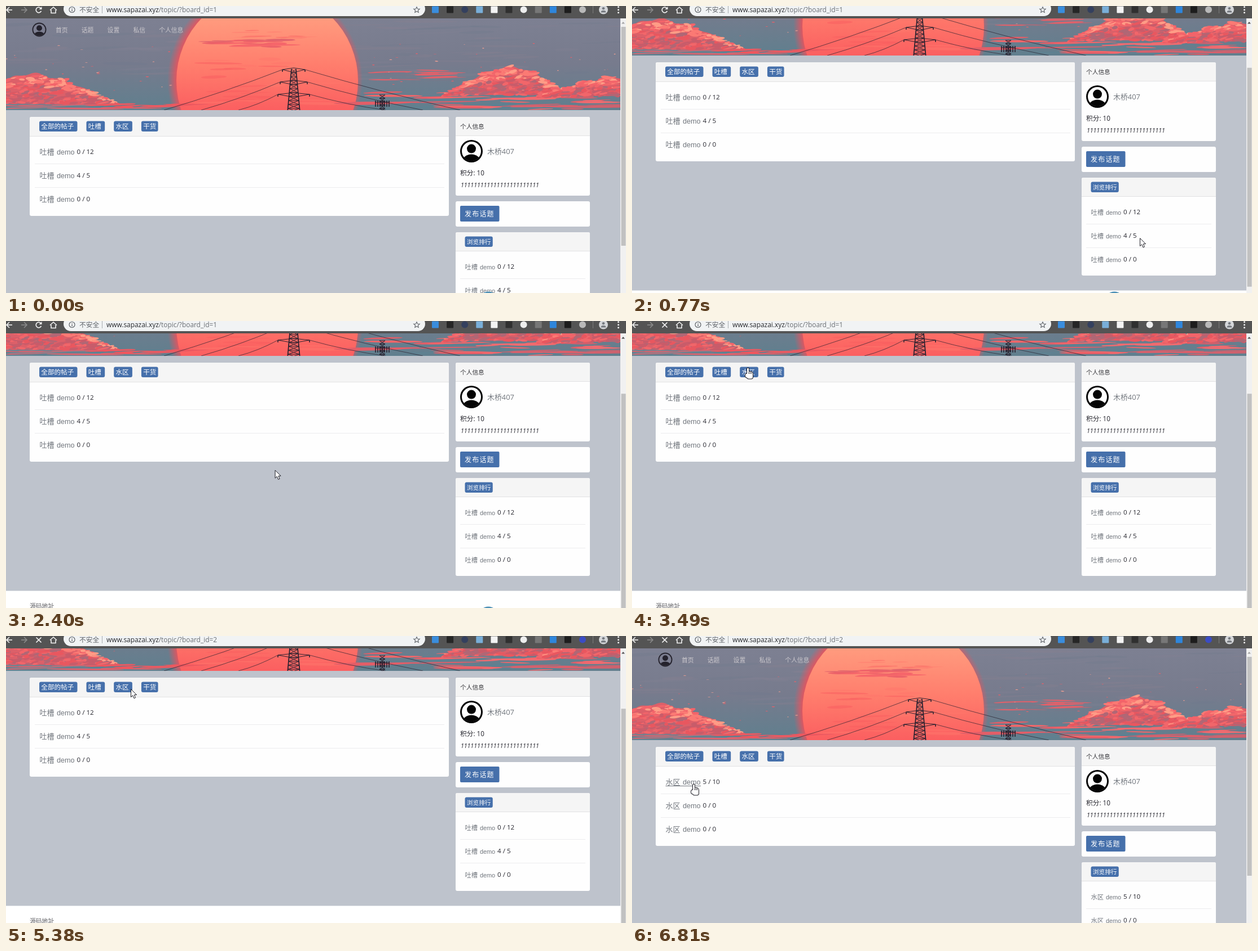
An HTML page with a canvas that plays this animation: 1099 by 510 pixels, repeating every 8000 ms.

```html
<!DOCTYPE html>
<html lang="zh">
<head>
<meta charset="utf-8">
<style>
html, body { margin: 0; width: 100%; height: 100%; overflow: hidden; }
canvas { display: block; }
</style>
</head>
<body>
<canvas id="stage" width="1099" height="510"></canvas>
<script>
const LOOP = 8000, BAR = 22, VIEW = 1089;
const CLICK = 3270, COMMIT = 3900, REPAINT = 5600;
const CJK = '"Noto Sans CJK SC", "Noto Sans CJK JP", "Noto Sans CJK", sans-serif';
const BODY = `"Open Sans", ${CJK}`, LINK = `"Liberation Sans", ${CJK}`;
const BLUE = '#4670ab', GREY = '#71767d', INK = '#25252d', PALE = '#f2f2f2';
const stage = document.getElementById('stage').getContext('2d');
let ctx = stage;

// Drawing helpers
function rect(x, y, w, h, fill, r = 0) {
  ctx.fillStyle = fill;
  ctx.beginPath();
  ctx.roundRect(x, y, w, h, r);
  ctx.fill();
}
function oval(x, y, rx, ry, fill, turn = 0) {
  ctx.fillStyle = fill;
  ctx.beginPath();
  ctx.ellipse(x, y, rx, ry, turn, 0, 7);
  ctx.fill();
}
const disc = (x, y, r, fill) => oval(x, y, r, r, fill);
function trace(points) {
  ctx.beginPath();
  points.forEach(([x, y], i) => i ? ctx.lineTo(x, y) : ctx.moveTo(x, y));
}
function stroke(color, width = 1) {
  ctx.strokeStyle = color;
  ctx.lineWidth = width;
  ctx.stroke();
}
function line(points, color, width) {
  trace(points);
  stroke(color, width);
}
function arc(x, y, r, from, to, color, width) {
  ctx.beginPath();
  ctx.arc(x, y, r, from, to);
  stroke(color, width);
}
// Draws the text and returns its width
function text(str, x, y, size, color, { style = '', family = BODY } = {}) {
  ctx.font = `${style} ${size}px ${family}`;
  ctx.fillStyle = color;
  ctx.fillText(str, x, y);
  return ctx.measureText(str).width;
}
function gradient(top, bottom, colors) {
  const g = ctx.createLinearGradient(0, top, 0, bottom);
  colors.forEach((c, i) => g.addColorStop(i / (colors.length - 1), c));
  return g;
}

// Sunset banner, painted once
function seeded(seed) {
  return () => (seed = (seed * 16807) % 2147483647) / 2147483647;
}
function paintBanner() {
  const canvas = document.createElement('canvas');
  canvas.width = VIEW;
  canvas.height = 185;
  ctx = canvas.getContext('2d');
  const rnd = seeded(4711);
  const between = (a, b) => a + (b - a) * rnd();
  const pick = list => list[Math.floor(rnd() * list.length)];
  const strokes = (n, x0, x1, y0, y1, length, thick, colors) => {
    for (let i = 0; i < n; i++) {
      oval(between(x0, x1), between(y0, y1), length * between(.3, 1),
        thick * between(.3, 1), pick(colors), between(-.05, .03));
    }
  };
  // A cloud is a solid hump with short dabs, lighter towards its crest
  const cloud = (x0, x1, peak, top, base) => {
    const crest = x => {
      const side = x < peak ? (peak - x) / (peak - x0) : (x - peak) / (x1 - peak);
      return base - (base - top) * (1 - side ** 1.6) - 3 * Math.sin(x / 7) * (1 - side);
    };
    ctx.fillStyle = '#dc6069';
    ctx.beginPath();
    for (let x = x0; x <= x1; x += 3) ctx.lineTo(x, crest(x));
    ctx.lineTo(x1, base);
    ctx.lineTo(x0, base);
    ctx.fill();
    for (let i = 0; i < (x1 - x0) * 1.6; i++) {
      const x = between(x0, x1), depth = rnd();
      const tones = depth < .35 ? ['#ff9c86', '#fb7a74', '#f3646a'] : ['#e9575f', '#c85c6a', '#f2666a', '#b06775'];
      oval(x, crest(x) + (base - crest(x)) * depth, between(3, 11), between(1, 3.2), pick(tones), between(-.4, .2));
    }
  };

  rect(0, 0, VIEW, 185, gradient(BAR, 185, ['#7d8092', '#777b8d', '#607f8e']));
  strokes(90, 0, VIEW, 25, 130, 70, 3, ['#84809444', '#6c7a8a44', '#8a7f9044']);

  const glow = ctx.createRadialGradient(459, 132, 158, 459, 132, 173);
  glow.addColorStop(0, '#f0505acc');
  glow.addColorStop(1, '#f0505a00');
  disc(459, 132, 173, glow);
  disc(463, 133, 161, gradient(BAR, 185, ['#ff9b7e', '#ff7e6d', '#fb5f60']));
  strokes(22, 360, 580, 90, 180, 45, 3, ['#fa5f6088', '#ff776c88']);
  strokes(18, 340, 490, 60, 73, 45, 2.5, ['#ec6269', '#f6666a', '#e0636c']);
  strokes(10, 420, 540, 42, 58, 35, 1.5, ['#ff8573', '#fb7269']);

  strokes(30, 620, VIEW, 150, 182, 70, 2.2, ['#e25e68', '#c9626f', '#5e8191', '#f36669']);
  strokes(16, 630, 800, 114, 132, 50, 2, ['#e2616a', '#b96875', '#75798b']);
  cloud(-60, 195, 40, 120, 175);
  cloud(780, 990, 900, 108, 158);
  cloud(950, 1150, 1085, 126, 160);
  strokes(18, 0, 300, 175, 184, 80, 1.8, ['#567f90', '#668897', '#d9646f']);
  strokes(18, 180, 320, 174, 182, 45, 1.6, ['#f4545b', '#e65b63']);
  strokes(20, 780, VIEW, 164, 184, 60, 2, ['#5d8192', '#d8606c', '#ef6b70']);
  strokes(26, 0, 300, 70, 150, 3, .8, ['#f1a092', '#e8616a']);
  strokes(30, 640, VIEW, 60, 150, 3, .8, ['#f1a092', '#e8616a']);

  const dark = '#2a2230';
  for (let y = 112; y < 185; y += 7) {
    const w = 4 + (y - 112) / 11;
    line([[510 - w, y], [510 + w, y + 7], [510 - w, y + 7], [510 + w, y]], dark);
    line([[510 - w, y], [510 - w - .6, y + 7]], dark, 1.8);
    line([[510 + w, y], [510 + w + .6, y + 7]], dark, 1.8);
  }
  for (let arm = 0; arm < 3; arm++) {
    const y = 113 + arm * 22, w = 20 + arm * 4;
    line([[510 - w, y], [510, y - 3], [510 + w, y], [510, y + 5], [510 - w, y]], dark);
    for (const side of [-1, 1]) {
      const x = 510 + side * w, run = (side < 0 ? 210 : 275) - arm * 70;
      line([[x, y], [x, y + 4]], dark, 1.6);
      ctx.beginPath();
      ctx.moveTo(x, y);
      ctx.quadraticCurveTo(x + side * run / 2, (y + 185) / 2 + 5, x + side * run, 185);
      stroke(dark, .7);
    }
  }
  for (let y = 158; y < 185; y += 6) line([[662, y], [672, y + 6], [662, y + 6], [672, y], [662, y]], dark);
  for (let x = 655; x < 681; x += 4) line([[x, 168], [x, 179]], dark, 1.6);
  line([[654, 171], [680, 171]], dark);
  ctx = stage;
  return canvas;
}
const banner = paintBanner();

// Pointer way points: time, x, y
const route = [
  [450, 912, 512], [680, 901, 415], [1230, 895, 398], [1700, 850, 338], [2120, 880, 389],
  [2400, 477, 265], [3050, 205, 83], [3600, 205, 83], [4060, 312, 190], [4810, 290, 188],
  [5380, 221, 94], [5750, 221, 94], [6810, 109, 263]];

function cursorAt(t) {
  if (t < route[0][0]) return null;
  const next = route.findIndex(k => k[0] > t);
  if (next < 0) return route.at(-1).slice(1);
  const [t0, x0, y0] = route[next - 1], [t1, x1, y1] = route[next];
  const p = (t - t0) / (t1 - t0);
  return [x0 + (x1 - x0) * p, y0 + (y1 - y0) * p];
}
function scrollAt(t) {
  if (t >= REPAINT) return 0;
  const tick = 680 + 85 * Math.floor((t - 680) / 85);
  const p = Math.min(1, Math.max(0, (tick - 560) / 290));
  return Math.round(123 * p * p * (3 - 2 * p));
}

// Page parts; links note whether the pointer is over them
let pointer = null, hand = false;
function hover(x, y, w, h) {
  const over = pointer && pointer[0] >= x && pointer[0] <= x + w && pointer[1] >= y && pointer[1] <= y + h;
  hand = hand || over;
  return over;
}
function card(x, y, w, h, head) {
  rect(x, y, w, h, '#fefefe', 3);
  if (!head) return;
  rect(x, y, w, head, '#f5f5f5', [3, 3, 0, 0]);
  rect(x, y + head, w, 1, '#e2e2e3');
}
function badge(label, x, y, size) {
  ctx.font = `500 ${size}px ${BODY}`;
  const w = ctx.measureText(label).width + 6.5;
  rect(x, y, w, 18.5, BLUE, 3);
  text(label, x + 3.3, y + 13.5, size, '#fff', { style: '500' });
  hover(x + 4, y, w - 10, 18);
  return w;
}
function person(x, y, r, color, back) {
  disc(x, y, r, color);
  disc(x, y, r * .85, back);
  ctx.save();
  ctx.beginPath();
  ctx.arc(x, y, r * .86, 0, 7);
  ctx.clip();
  disc(x, y - r * .22, r * .4, color);
  oval(x, y + r * .87, r * .77, r * .6, color);
  ctx.restore();
}
function topics(label, counts, x, y, left, right, scale) {
  counts.forEach((count, i) => {
    const base = y + i * 42, width = 62.5 * scale;
    text(label, x, base, 13 * scale, GREY);
    text('demo', x + 30.5 * scale, base, 12.6 * scale, GREY, { family: LINK });
    text(count, x + width + 3.5, base - 1, 11.6, INK);
    if (hover(x, base - 12, width, 16)) rect(x, base + 2, width, 1, GREY);
    if (i < 2) rect(left, base + 16, right - left, 1, '#ececee');
  });
}

function page(second) {
  ctx.drawImage(banner, 0, 0);
  person(59, 42, 12.5, '#24222c', '#7c7e90');
  let x = 88;
  for (const item of ['首页', '话题', '设置', '私信', '个人信息']) {
    x += text(item, x, 46.5, 10.8, '#cbc8cd') + 24.2;
  }

  card(42, 197, 743, 176, 34);
  x = 59;
  for (const board of ['全部的帖子 ', '吐槽 ', '水区 ', '干货']) x += badge(board, x, 204.5, 11.6) + 16;
  const label = second ? '水区' : '吐槽';
  const counts = second ? ['5 / 10', '0 / 0', '0 / 0'] : ['0 / 12', '4 / 5', '0 / 0'];
  topics(label, counts, 59.5, 264, 51, 777, 1);

  card(797, 197, 238, 140, 33);
  text('个人信息', 805, 218, 10.7, '#38383c');
  person(825, 258, 20, '#050505', '#fff');
  text('木桥407', 853, 262.5, 12.9, GREY);
  text('积分: 10', 805, 300.5, 11.7, INK);
  text('1'.repeat(24), 806, 322, 10.5, INK, { style: 'italic' });

  card(797, 347, 238, 45);
  rect(805, 355, 69.5, 28, BLUE, 2);
  ctx.letterSpacing = '1.2px';
  text('发布话题', 813, 373.5, 12, '#fff', { style: '500' });
  ctx.letterSpacing = '0px';

  card(797, 402, 238, 174, 33);
  badge('浏览排行', 813.5, 409.5, 10.7);
  topics(label, counts, 813.5, 468, 805, 1027, .865);

  rect(0, 602.5, VIEW, 60, '#fff');
  text('源码地址', 42, 633.5, 10.8, '#5c5c60');
}

function scrollbar(scroll) {
  rect(VIEW, BAR, 10, 488, '#f1f1f1');
  rect(VIEW + 1.5, 37 + scroll * .75, 8, 389, '#c1c1c1');
  trace([[1091, 31.5], [1094, 28], [1097, 31.5]]);
  ctx.fillStyle = scroll ? '#505050' : '#a3a3a3';
  ctx.fill();
}

function arrowIcon(x, dir, color) {
  line([[x - dir * 10, 7], [x, 7]], color, 1.6);
  line([[x - dir * 5, 2], [x, 7], [x - dir * 5, 12]], color, 1.6);
}
function browserBar(loading, second) {
  rect(0, 0, 1099, BAR, '#545454');
  arrowIcon(1, -1, PALE);
  arrowIcon(37, 1, '#8b8b8b');
  if (loading) {
    for (const d of [-4.5, 4.5]) line([[58 - d, 2.5], [58 + d, 11.5]], PALE, 1.7);
  } else {
    arc(58, 7, 4.8, .4, 5.6, PALE, 1.7);
    trace([[63.5, 1], [63.5, 6], [58.5, 6]]);
    ctx.fillStyle = PALE;
    ctx.fill();
  }
  line([[78, 7.5], [84, 2], [90, 7.5]], PALE, 1.6);
  line([[80, 7], [80, 12.5], [88, 12.5], [88, 7]], PALE, 1.6);

  rect(102, -8, 641, 26, '#f1f3f4', 13);
  arc(117, 6.5, 5, 0, 7, '#5f6368', 1.2);
  rect(116.4, 5.8, 1.3, 3.6, '#5f6368');
  rect(116.4, 3.4, 1.3, 1.3, '#5f6368');
  text('不安全', 130, 11, 11.7, '#5f6368');
  rect(170, 0, 1, 13, '#a9acb0');
  const host = text('www.sapazai.xyz', 178, 10.5, 11.9, '#27292d');
  text('/topic/?board_id=' + (second ? 2 : 1), 178 + host, 10.5, 11.9, '#6b6f74');
  line(Array.from({ length: 11 }, (_, i) => {
    const a = i * Math.PI / 5 - Math.PI / 2, r = i % 2 ? 2.5 : 5.5;
    return [728 + r * Math.cos(a), 7 + r * Math.sin(a)];
  }), '#5f6368', 1.1);

  const plugins = ['#3a8ddd', '#262626', '#34405e', '#79afd9', '#f4f4f4', '#303030',
    '#eeeeee', '#777777', '#2f86dc', '#1d1d1d', second ? '#3b4cc4' : '#b9b9b9'];
  plugins.forEach((color, i) => rect(755 + i * 26.1, .5, 12, 12, color, i % 4 === 2 ? 6 : 1));
  rect(1040, 0, 1, 13, '#7c7c7c');
  disc(1059, 6.5, 8, '#d5d7da');
  disc(1059, 4.3, 2.3, '#767a80');
  rect(1054.5, 8, 9, 3.6, '#767a80', [4, 4, 0, 0]);
  for (let i = 0; i < 3; i++) disc(1085.5, 1.8 + i * 5, 1.5, PALE);
}

function drawCursor(x, y) {
  ctx.save();
  ctx.translate(x + .5, y + .5);
  ctx.lineJoin = 'round';
  if (hand) {
    ctx.beginPath();
    ctx.roundRect(-1.5, 0, 3, 14, 1.5);
    ctx.roundRect(-1.5, 6.5, 10, 12.5, [1, 4, 3, 3]);
    ctx.roundRect(-4.5, 10, 8, 7, 3);
    stroke('#1c1c24', 2);
    ctx.fillStyle = '#fff';
    ctx.fill();
    for (let i = 0; i < 3; i++) line([[1.5 + i * 2.4, 7], [1.5 + i * 2.4, 10.5]], '#1c1c24', .9);
  } else {
    trace([[0, 0], [0, 14], [3.2, 11], [5.5, 16.3], [8, 15.2], [5.8, 10.2], [10, 10]]);
    ctx.closePath();
    ctx.fillStyle = '#fff';
    ctx.fill();
    stroke('#1c1c24');
  }
  ctx.restore();
}

function draw(t) {
  const scroll = scrollAt(t), at = cursorAt(t);
  pointer = at && [at[0], at[1] + scroll];
  hand = false;
  rect(0, 0, 1099, 510, '#bec3cc');
  ctx.save();
  ctx.beginPath();
  ctx.rect(0, BAR, VIEW, 488);
  ctx.clip();
  ctx.translate(0, -scroll);
  page(t >= REPAINT);
  ctx.restore();
  if (t < CLICK) disc(855, 524, 16.5, '#4b8fb5');
  scrollbar(scroll);
  browserBar(t >= CLICK, t >= COMMIT);
  if (at) drawCursor(...at);
}

const start = performance.now();
function frame() {
  draw((performance.now() - start) % LOOP);
  requestAnimationFrame(frame);
}
frame();
</script>
</body>
</html>
```
